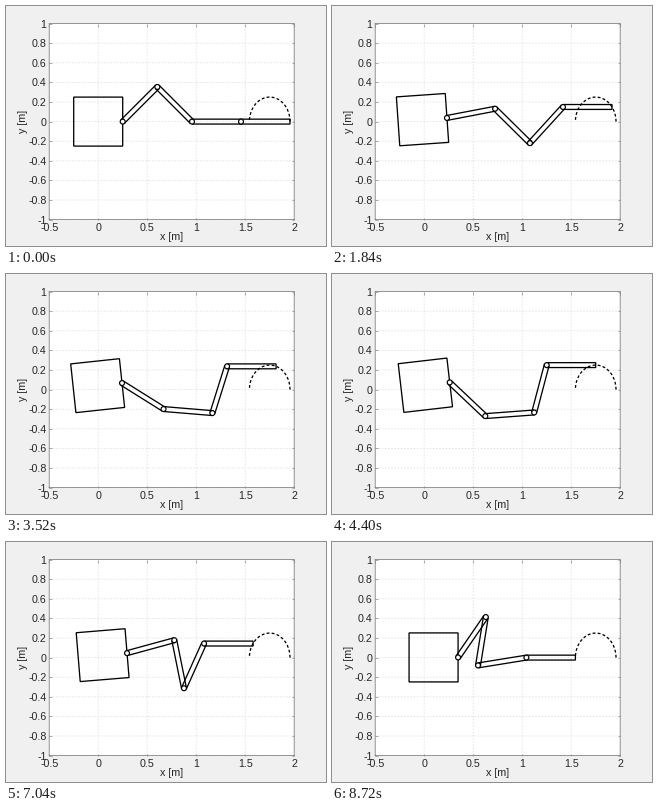
A matplotlib script for the animation above (8.8 s loop, 320 px wide and 240 px high).

```python
import numpy as np
import matplotlib.pyplot as plt
from matplotlib.animation import FuncAnimation

W, H, DPI = 320, 240, 80
FRAMES, INTERVAL = 110, 80
PX = 72 / DPI                 # one pixel in points
LEFT, BOTTOM, WIDTH, HEIGHT = 43.2, 213.6, 245, 196   # plot box, pixels

LINK, HALF_BASE, HALF_WIDTH = 0.5, 0.25, 0.025
BASE_MASS = 10                # relative to one link
ARC_X, ARC_RX, ARC_RY = 1.75, 0.2071, 0.25
MASS_SUM = np.array([4.121, 0.3536])   # conserved centre of mass

# Time, angle in degrees, slope in degrees per step
ARM = np.array([(0, 45, -1.1), (14, 26.8, -1.65), (33, -9.4, -2.15),
                (55, -43.4, -0.1), (71, -31.8, 1.8), (88, 15.3, 2.25),
                (109, 55.5, 1.95)])
TILT = np.array([(0, 0, 0.2), (14, 2.6, 0.165), (33, 5.2, 0.105),
                 (55, 6.6, 0.03), (71, 6.5, -0.045), (88, 4.7, -0.18),
                 (109, 0, -0.25)])


def hermite(keys, n):
    """Smooth curve through (time, value, slope) keys."""
    k = min(np.searchsorted(keys[:, 0], n, side="right"), len(keys) - 1)
    (t0, v0, m0), (t1, v1, m1) = keys[k - 1], keys[k]
    h = t1 - t0
    s = (n - t0) / h
    return (v0 + (v1 - v0) * s * s * (3 - 2 * s)
            + h * (m0 * s * (1 - s) ** 2 + m1 * s * s * (s - 1)))


def unit(angle):
    return np.array([np.cos(angle), np.sin(angle)])


def bend(a, b):
    """Middle joint of two equal links from a to b, on the lower side."""
    d = b - a
    dist = np.hypot(*d)
    height = np.sqrt(max(LINK ** 2 - dist ** 2 / 4, 0))
    return (a + b) / 2 + height * np.array([d[1], -d[0]]) / dist


def pose(n):
    """Base centre, base tilt and the five points of the arm."""
    theta = np.pi * (n - 1 + np.exp(-n / 4)) / 108
    tip = np.array([ARC_X + ARC_RX * np.cos(theta), ARC_RY * np.sin(theta)])
    wrist = tip - [LINK, 0]
    tilt, arm = np.radians([hermite(TILT, n), hermite(ARM, n)])
    base = np.zeros(2)
    for _ in range(30):
        shoulder = base + HALF_BASE * unit(tilt)
        elbow = shoulder + LINK * unit(arm)
        mid = bend(elbow, wrist)
        links = shoulder / 2 + elbow + mid + wrist + tip / 2
        base = (MASS_SUM - links) / BASE_MASS
    return base, tilt, np.array([shoulder, elbow, mid, wrist, tip])


def base_outline(centre, tilt):
    u = HALF_BASE * unit(tilt)
    v = np.array([-u[1], u[0]])
    return centre + np.array([u + v, v - u, -u - v, u - v])


def link_outline(a, b):
    d = (b - a) / np.hypot(*(b - a))
    side = HALF_WIDTH * np.array([-d[1], d[0]])
    return np.array([a + side, b + side, b - side, a - side])


plt.rcParams["font.family"] = "Liberation Sans"
fig = plt.figure(figsize=(W / DPI, H / DPI), dpi=DPI, facecolor="#f0f0f0")
ax = fig.add_axes([LEFT / W, (H - BOTTOM) / H, WIDTH / W, HEIGHT / H])
ax.set(xlim=(-0.5, 2), ylim=(-1, 1))

xticks = np.arange(-1, 5) / 2
yticks = np.arange(-5, 6) / 5
ax.set_xticks(xticks, [f"{v:g}" for v in xticks])
ax.set_yticks(yticks, [f"{v:g}" for v in yticks])
ax.tick_params(direction="in", top=True, right=True, length=2.5 * PX,
               width=0.6 * PX, color="#777777", labelcolor="#262626",
               labelsize=10.6 * PX)
ax.tick_params(axis="x", pad=3.5 * PX)
ax.tick_params(axis="y", pad=2.7 * PX)
ax.set_axisbelow(True)
ax.grid(color="#e0e0e0", lw=0.8 * PX, ls=(0, (2, 2)), snap=False)
for spine in ax.spines.values():
    spine.set(color="#808080", linewidth=0.8 * PX, snap=False)

label = dict(size=10.8 * PX, color="#262626", ha="center", va="center")
fig.text(166 / W, (H - 231) / H, "x [m]", **label)
fig.text(17.5 / W, (H - 115.5) / H, "y [m]", rotation=90, **label)

phi = np.linspace(0, np.pi, 80)
ax.plot(ARC_X + ARC_RX * np.cos(phi), ARC_RY * np.sin(phi), color="black",
        lw=1.3 * PX, ls=(0, (2.2, 1.7)), dash_capstyle="butt", zorder=3)


def outline(z):
    shape = plt.Polygon(np.zeros((4, 2)), fill=False, ec="black",
                        lw=1.3 * PX, snap=False, zorder=z)
    return ax.add_patch(shape)


def joint():
    return ax.add_patch(plt.Circle((0, 0), HALF_WIDTH, fc="white", ec="black",
                                   lw=1.2 * PX, snap=False, zorder=6))


body = outline(4)
bars = [outline(5) for _ in range(4)]
joints = [joint() for _ in range(4)]


def draw(n):
    base, tilt, points = pose(n)
    body.set_xy(base_outline(base, tilt))
    for bar, pin, a, b in zip(bars, joints, points, points[1:]):
        bar.set_xy(link_outline(a, b))
        pin.center = tuple(a)
    return [body, *bars, *joints]


anim = FuncAnimation(fig, draw, frames=FRAMES, interval=INTERVAL,
                     repeat=True, repeat_delay=0)
plt.show()
```
